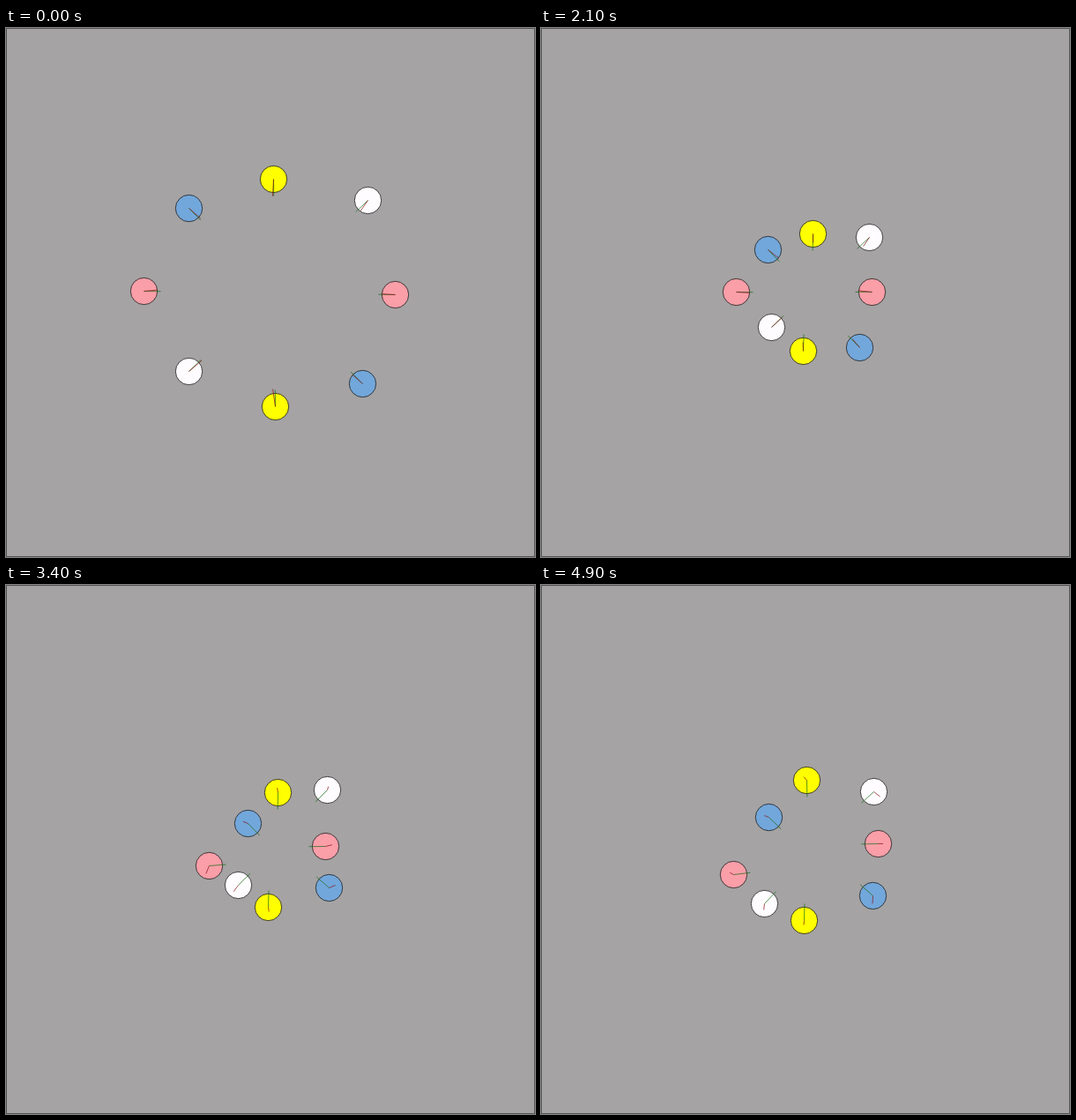
Animation of 600 by 600 pixels, one loop 5000 ms. Source, as an HTML page with a canvas:

```html
<!DOCTYPE html>
<html lang="en">
<head>
<meta charset="utf-8">
<title>Crossing agents</title>
<style>
  html, body { margin: 0; width: 100%; height: 100%; overflow: hidden; background: #a5a3a4; }
  canvas { display: block; width: 600px; height: 600px; }
</style>
</head>
<body>
<canvas id="stage" width="600" height="600"></canvas>
<script>
const ctx = document.getElementById('stage').getContext('2d');
const LOOP = 5000, STEP = 100, RADIUS = 15.2;
const BRAKE = 0.45;      // slowing of agents that travel vertically
const LOOK = 0.5;        // seconds of travel shown by the red line
const WOBBLE = 0.3;      // spread of the red line's angle on the way in
const COLORS = ['#ffff00', '#fefcfe', '#fa9ea8', '#72a7db'];

// Clockwise from the top: start, time of the bounce,
// then the places at 3.0, 3.9 and 4.9 s on the way out
const agents = [
  { start: [303.5, 171.8], bounce: 2700, away: [[308.8, 240], [307, 230.2], [301.8, 221.2]] },
  { start: [410.3, 195.5], bounce: 2500, away: [[364.2, 236.5], [366.7, 230], [377, 234.8]] },
  { start: [441.8, 302.3], bounce: 2800, away: [[356.8, 298], [370, 294.8], [382.3, 293.5]] },
  { start: [404.4, 403.8], bounce: 2600, away: [[360, 347.5], [372.3, 342.8], [376.3, 352.6]] },
  { start: [305.3, 429.3], bounce: 2600, away: [[297, 361.6], [298.3, 370.5], [298.2, 380.5]] },
  { start: [207.4, 389.6], bounce: 2600, away: [[267.8, 334.3], [258.4, 347.4], [253.7, 361.6]] },
  { start: [156.6, 298.2], bounce: 2600, away: [[233.6, 310], [226.9, 325.4], [218.7, 328.3]] },
  { start: [207.5, 204.4], bounce: 3100, away: [[279.2, 272], [269, 268], [258.4, 263.8]] }
];

// Each agent heads for the start of the one opposite
agents.forEach((agent, i) => {
  agent.color = COLORS[i % 4];
  agent.seed = i + 1;
  agent.goal = agents[(i + 4) % 8].start;
  const dx = agent.goal[0] - agent.start[0], dy = agent.goal[1] - agent.start[1];
  agent.brake = BRAKE * (dy / Math.hypot(dx, dy)) ** 4;
});

// Parabola through the three outward places
function retreat({ away: [a, b, c] }, t) {
  const s = t / 1000 - 3;
  return a.map((p, k) => {
    const v = (b[k] - p) / 0.9, w = c[k] - b[k];
    return p + v * s + (w - v) / 1.9 * s * (s - 0.9);
  });
}

function placeAt(agent, t) {
  if (t >= agent.bounce) return retreat(agent, t);
  const u = t / agent.bounce;
  const f = u + agent.brake * u * (1 - u);
  const meet = retreat(agent, agent.bounce);
  return agent.start.map((p, k) => p + (meet[k] - p) * f);
}

function random(seed) {
  const n = Math.sin(seed * 12.9898) * 43758.5453;
  return n - Math.floor(n);
}

function headAt(agent, t) {
  const a = placeAt(agent, t), b = placeAt(agent, t + 1);
  const vx = (b[0] - a[0]) * 1000 * LOOK, vy = (b[1] - a[1]) * 1000 * LOOK;
  const turn = t < agent.bounce ? (random(agent.seed + t / STEP * 8) - 0.5) * WOBBLE : 0;
  const c = Math.cos(turn), s = Math.sin(turn);
  return [vx * c - vy * s, vx * s + vy * c];
}

function line(x, y, dx, dy, color) {
  ctx.strokeStyle = color;
  ctx.beginPath();
  ctx.moveTo(x, y);
  ctx.lineTo(x + dx, y + dy);
  ctx.stroke();
}

function drawAgent(agent, t) {
  const [x, y] = placeAt(agent, t).map(v => Math.floor(v) + 0.5);
  const gx = agent.goal[0] - x, gy = agent.goal[1] - y;
  const scale = 19 / Math.hypot(gx, gy);
  ctx.lineWidth = 0.9;
  ctx.fillStyle = agent.color;
  ctx.strokeStyle = '#2c2c2c';
  ctx.beginPath();
  ctx.arc(x, y, RADIUS, 0, Math.PI * 2);
  ctx.fill();
  ctx.stroke();
  line(x, y, gx * scale, gy * scale, 'rgba(25, 110, 25, .8)');
  line(x, y, ...headAt(agent, t), 'rgba(135, 20, 25, .8)');
}

function draw(t) {
  ctx.fillStyle = '#a5a3a4';
  ctx.fillRect(0, 0, 600, 600);
  ctx.lineWidth = 1;
  ctx.strokeStyle = '#555';
  ctx.strokeRect(0.5, 0.5, 599, 599);
  agents.forEach(agent => drawAgent(agent, t));
}

const begin = performance.now();
function tick() {
  const t = (performance.now() - begin) % LOOP;
  draw(Math.floor(t / STEP) * STEP);
  requestAnimationFrame(tick);
}
tick();
</script>
</body>
</html>
```
